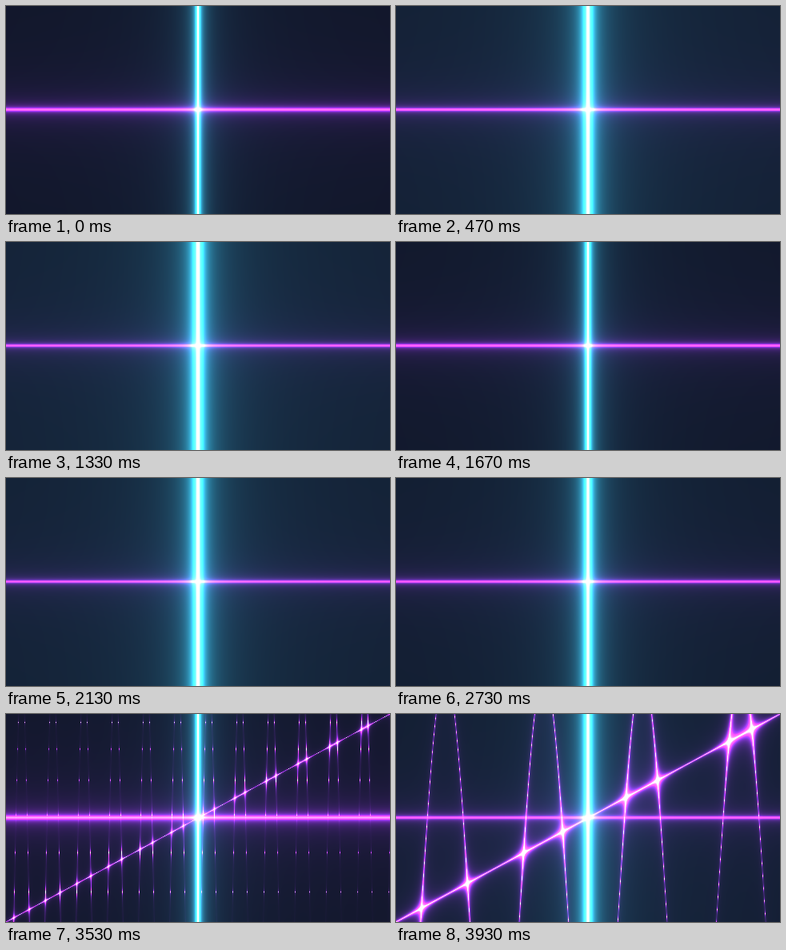
Write an HTML page with a canvas that moves like this. It is 480x260 px and loops after 3990 ms.

```html
<!DOCTYPE html>
<html lang="en">
<head>
<meta charset="utf-8">
<title>Light beams</title>
<style>
  html, body { margin: 0; width: 100%; height: 100%; overflow: hidden; background: #101626; }
  canvas { display: block; width: 480px; height: 260px; }
</style>
</head>
<body>
<canvas id="stage" width="480" height="260"></canvas>
<script>
const W = 480, H = 260, LOOP = 3990, STEPS = 60;
const BASE = [13, 12, 28];
const CYAN = [0.25, 1, 1.13];
const PURPLE = [0.7, 0.15, 1];

// [step, strength] pairs
const CYAN_KEYS = [[0, 1], [15, 3.2], [25, 1.2], [32, 2.1], [41, 1.7], [53, 1], [59, 1.75]];
const PURPLE_KEYS = [[0, 450], [15, 220], [25, 370], [32, 280], [41, 300], [53, 680], [59, 320]];

const ctx = document.getElementById('stage').getContext('2d');
const image = ctx.createImageData(W, H);
const pixels = image.data;
const wave = new Float32Array(W);
const beam = new Float32Array(W);

function ease(keys, step) {
  let i = 0;
  while (i < keys.length - 2 && step > keys[i + 1][0]) i++;
  const [t0, a] = keys[i], [t1, b] = keys[i + 1];
  const u = (step - t0) / (t1 - t0);
  return a + (b - a) * u * u * (3 - 2 * u);
}

function draw(step) {
  const cyan = ease(CYAN_KEYS, step);
  const purple = ease(PURPLE_KEYS, step);

  // The oscillating curve stretches out while its glow grows.
  const growth = (step - 53) / 6;
  const period = 39 * Math.pow(3.16, growth);
  const glow = step > 41 ? 18000 * Math.pow(4.17, growth) : 0;

  for (let x = 0; x < W; x++) {
    const px = x + 0.5;
    beam[x] = cyan * (8 + 650 / Math.abs(px - W / 2));
    wave[x] = 312 * Math.cos(2 * Math.PI * px / period);
  }

  let p = 0;
  for (let y = 0; y < H; y++) {
    const rise = H - y - 0.5;
    const horizon = purple / Math.max(Math.abs(y - 129), 0.7);
    for (let x = 0; x < W; x++) {
      let violet = horizon;
      if (glow) {
        const diagonal = Math.abs(rise - (x + 0.5) * H / W) * 0.879;
        const curve = Math.abs(rise + wave[x]);
        violet += glow / Math.max(diagonal * curve, 0.01);
      }
      for (let c = 0; c < 3; c++) {
        pixels[p++] = BASE[c] + CYAN[c] * beam[x] + PURPLE[c] * violet;
      }
      pixels[p++] = 255;
    }
  }
  ctx.putImageData(image, 0, 0);
}

const startOf = step => Math.round(step * 20 / 3) * 10;

function stepAt(time) {
  let step = Math.min(STEPS - 1, Math.floor(time * 3 / 200) + 1);
  while (startOf(step) > time) step--;
  return step;
}

let shown = -1;
function tick() {
  const step = stepAt(performance.now() % LOOP);
  if (step !== shown) draw(shown = step);
  requestAnimationFrame(tick);
}
tick();
</script>
</body>
</html>
```
